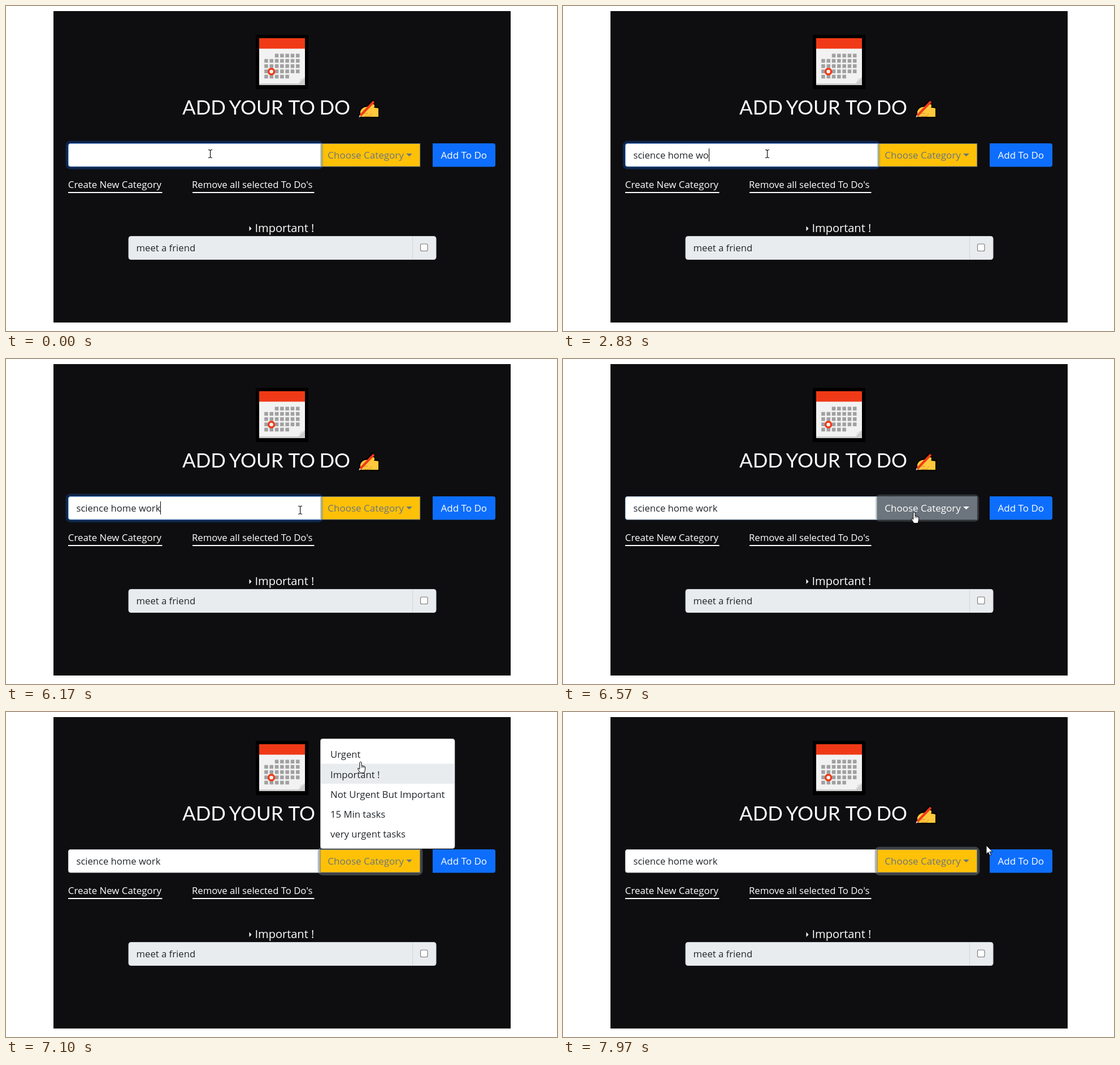
Recreate the animation shown at these times as an HTML page. Size 975 px wide and 575 px high, loop 8 s.

```html
<!DOCTYPE html>
<html lang="en">
<head>
<meta charset="utf-8">
<title>To do list</title>
<style>
html, body { margin: 0; width: 100%; height: 100%; overflow: hidden; background: #fff; }
svg { display: block; }
text { font: 16.7px "Open Sans", "Noto Sans", sans-serif; white-space: pre; }
.title text { font: 35px Lato, sans-serif; }
</style>
</head>
<body>
<svg width="975" height="575" viewBox="0 0 975 575">
  <rect x="84" y="9" width="809" height="551" fill="#0e0e10"/>

  <rect x="442" y="51" width="93" height="96"/>
  <rect x="448" y="57" width="81" height="83" fill="#f2f2f2"/>
  <rect x="448" y="57" width="81" height="18.5" fill="#f03a17"/>
  <path d="M448 137h70l11-11v14h-81z" fill="#ccc"/>
  <path d="M518 137l3-8 8-3z" fill="#e3e3e3"/>
  <g id="days" fill="#a0a0a0"></g>
  <circle cx="469.6" cy="116" r="5" fill="#f2f2f2" stroke="#f03a17" stroke-width="3.4"/>

  <g class="title" fill="#fff">
    <text x="312" y="192">ADD</text>
    <text x="394.5" y="192">YOUR</text>
    <text x="499.5" y="192">TO</text>
    <text x="554.5" y="192">DO</text>
  </g>
  <g stroke-linejoin="round">
    <path id="palm" d="M627 187q2-6 8-8l6-1 7-4q4-1 4 3l-1 3 8 1v15h-29q-5-1-3-4z"
      fill="#ffc83d" stroke="#000" stroke-width="5" paint-order="stroke"/>
    <path d="M625 196L651 168" stroke="#000" stroke-width="8"/>
    <path d="M627 187q2-6 8-8l6-1 7-4q4-1 4 3l-1 3 8 1v15h-29q-5-1-3-4z" fill="#ffc83d"/>
    <path d="M631 190h10M634 195h10l3-5" fill="none" stroke="#e5a02d" stroke-width="1.3"/>
    <path d="M627 194L651 169" stroke="#f03a17" stroke-width="4"/>
    <path d="M624.500 197l1-4 3 2.500z" fill="#d8d8d8"/>
  </g>

  <path d="M755 243h107q4 0 4 4v33.500q0 4-4 4h-107z" fill="#0d6efd"/>
  <g fill="#fff">
    <text x="769.500" y="270" style="font-size:17px">Add To Do</text>
    <text x="109.800" y="322" style="font-size:16.85px">Create New Category</text>
    <text x="329" y="322">Remove all selected To Do's</text>
    <path d="M110 329h166.500v2h-166.500zM330 329h215.500v2h-215.500zM430.500 389.500l4 4.200-4 4.200z"/>
    <text x="440.500" y="400" style="font-size:20px">Important !</text>
  </g>

  <rect x="217" y="407.500" width="544" height="41" rx="4" fill="#e9ecef" stroke="#ced4da"/>
  <path d="M719.500 408v40" stroke="#ced4da"/>
  <text x="230.500" y="434" fill="#212529">meet a friend</text>
  <rect x="733.500" y="421" width="12.500" height="12.500" rx="2.300" fill="#fff" stroke="#767676" stroke-width="1.100"/>

  <g id="live"></g>
</svg>
<script>
const LOOP = 8000, STEP = 200 / 3;
const live = document.getElementById('live');
const pen = document.createElement('canvas').getContext('2d');

const typing = [
  [-99, '', 0], [500, 'science home', 1], [1230, 'science home', 0],
  [1370, 'science home ', 1], [1630, 'science home w', 1],
  [1770, 'science home wo', 1], [2300, 'science home wo', 0],
  [2370, 'science home wok', 1], [2830, 'science home wo', 1],
  [2900, 'science home wor', 1], [3500, 'science home wor', 0],
  [4030, 'science home wor', 1], [4570, 'science home wor', 0],
  [5030, 'science home work', 1], [5570, 'science home work', 0],
  [6100, 'science home work', 1], [6570, 'science home work', 0]
];
const path = [
  [-99, 361, 261], [5900, 361, 261], [6370, 621.5, 270.5], [6630, 621.5, 270.5],
  [6770, 621.5, 182], [6830, 621.5, 142.5], [6900, 623, 115], [7030, 627, 92],
  [7230, 628.5, 80], [7570, 628.5, 80], [7970, 749, 236], [9000, 749, 236]
];
const items = ['Urgent', 'Important !', 'Not Urgent But Important', '15 Min tasks', 'very urgent tasks'];
const amber = [255, 193, 7], grey = [108, 117, 125], white = [255, 255, 255];

const clamp = v => Math.max(0, Math.min(1, v));
const fade = (t, start) => 1 - (1 - clamp((t - start) / 150)) ** 2;
const mix = (a, b, p) => `rgb(${a.map((v, i) => Math.round(v + (b[i] - v) * p))})`;
const label = (x, y, s, fill, size = 16.7) =>
  `<text x="${x}" y="${y}" fill="${fill}" style="font-size:${size}px">${s}</text>`;

function ring(x, y, w, h, color, p) {
  const d = 4.4 * p;
  return `<rect x="${x - d / 2}" y="${y - d / 2}" width="${w + d}" height="${h + d}" rx="${4 + d / 2}"
    fill="none" stroke="${color}" stroke-opacity="${p}" stroke-width="${d}"/>`;
}

function mouse(t) {
  const i = path.findIndex(k => k[0] > t), [t0, x0, y0] = path[i - 1], [t1, x1, y1] = path[i];
  let p = (t - t0) / (t1 - t0);
  if (t1 === 6370 || t1 === 7970) p = p * p * (3 - 2 * p);
  return [x0 + (x1 - x0) * p, y0 + (y1 - y0) * p];
}

function field(t) {
  const [, s, caret] = typing.findLast(k => k[0] <= t);
  const focus = 1 - fade(t, 6500);
  pen.font = '16.63px "Open Sans", "Noto Sans", sans-serif';
  const end = Math.round(124.5 + pen.measureText(s).width);
  return ring(110, 243, 447, 41.5, '#0d6efd', focus).replace(/stroke-opacity="[^"]*"/, `stroke-opacity="${focus * .25}"`) +
    `<path d="M557 243.500H114.500q-4 0-4 4v32.500q0 4 4 4H557z" fill="#fff"
      stroke="${mix([206, 212, 218], [134, 183, 254], focus)}" stroke-width="1.100"/>` +
    label(124.5, 270, s, '#212529', 16.63) +
    (caret ? `<rect x="${end}" y="252" width="1" height="23"/>` : '');
}

function button(t) {
  const hover = fade(t, 6200) * (1 - fade(t, 6770));
  const focus = t < 7430 ? fade(t, 6500) : t < 7570 ? 1 - fade(t, 7430) : fade(t, 7570);
  const ink = mix(grey, white, hover);
  const base = t >= 7490 && t < 7560 ? [255, 202, 56] : amber;
  return ring(556, 243, 177, 41.5, '#6c757d', focus).replace(/stroke-opacity="[^"]*"/, `stroke-opacity="${focus * .5}"`) +
    `<rect x="556" y="243.500" width="176.700" height="40.500" fill="${mix(base, grey, hover)}" stroke="#6c757d"/>` +
    label(569.3, 270, 'Choose Category', ink, 17) +
    `<path d="M708.200 261h10.600l-5.300 5.300z" fill="${ink}"/>`;
}

function menu(t) {
  if (t < 6700 || t >= 7570) return '';
  const over = Math.floor((mouse(t - STEP)[1] - 56.5) / 35.3), pressed = t >= 7490;
  return '<rect x="556.500" y="47.500" width="237.500" height="194" rx="4" fill="#fff" stroke="#d8d8d8" stroke-width=".6"/>' +
    items.map((s, i) => {
      const on = i === over, y = 56.3 + i * 35.3;
      return (on ? `<rect x="557" y="${y}" width="237" height="35.300" fill="${pressed ? '#0d6efd' : '#e9ecef'}"/>` : '') +
        label(574, y + 24.9, s, on && pressed ? '#fff' : '#212529', i === 2 ? 16.85 : 16.7);
    }).join('');
}

function cursor(t) {
  const [x, y] = mouse(t);
  const shape = t >= 7490
    ? '<path d="M0 0V15.500l3.500-3.400 2.600 5.800 2.400-1-2.500-5.700h5z" fill="#fff" stroke="#000"/>'
    : x < 556
    ? '<path d="M-3-6.500H-1L.5-5.500 2-6.500H4M.5-5.500V6.500M-3 7.500H-1L.5 6.500 2 7.500H4" fill="none" stroke="#000" stroke-width="1.100"/>'
    : '<path d="M-1.700 1.500q1.700-2.500 3.300 0v5.500l5 1.200q2 .6 1.700 3l-.8 5.300-1 3.500h-7.200l-4-6.500q-.8-2.200 1-1.900l2 1.800z" fill="#fff" stroke="#000"/>' +
      '<path d="M1.600 7v4M4 8v3M6.300 8.500v2.500" stroke="#000" stroke-width=".8"/>';
  return `<g transform="translate(${x} ${y})">${shape}</g>`;
}

function draw(t) {
  const parts = t < 6500 ? [button(t), field(t)] : [field(t), button(t)];
  live.innerHTML = parts.join('') + menu(t) + cursor(t);
}

let days = '';
for (let r = 0; r < 5; r++) for (let c = 0; c < 7; c++) {
  if ((r === 0 && c < 2) || (r === 4 && c > 4)) continue;
  days += `<rect x="${457.2 + c * 9.3}" y="${84.5 + r * 9.3}" width="6.500" height="6.500"/>`;
}
document.getElementById('days').innerHTML = days;

let last;
function tick(now) {
  const k = Math.floor(((now % LOOP) + 4) / STEP - .5);
  if (k !== last) draw(Math.round((k + .5) * STEP / 10) * 10);
  last = k;
  requestAnimationFrame(tick);
}
draw(-30);
requestAnimationFrame(tick);
</script>
</body>
</html>
```
